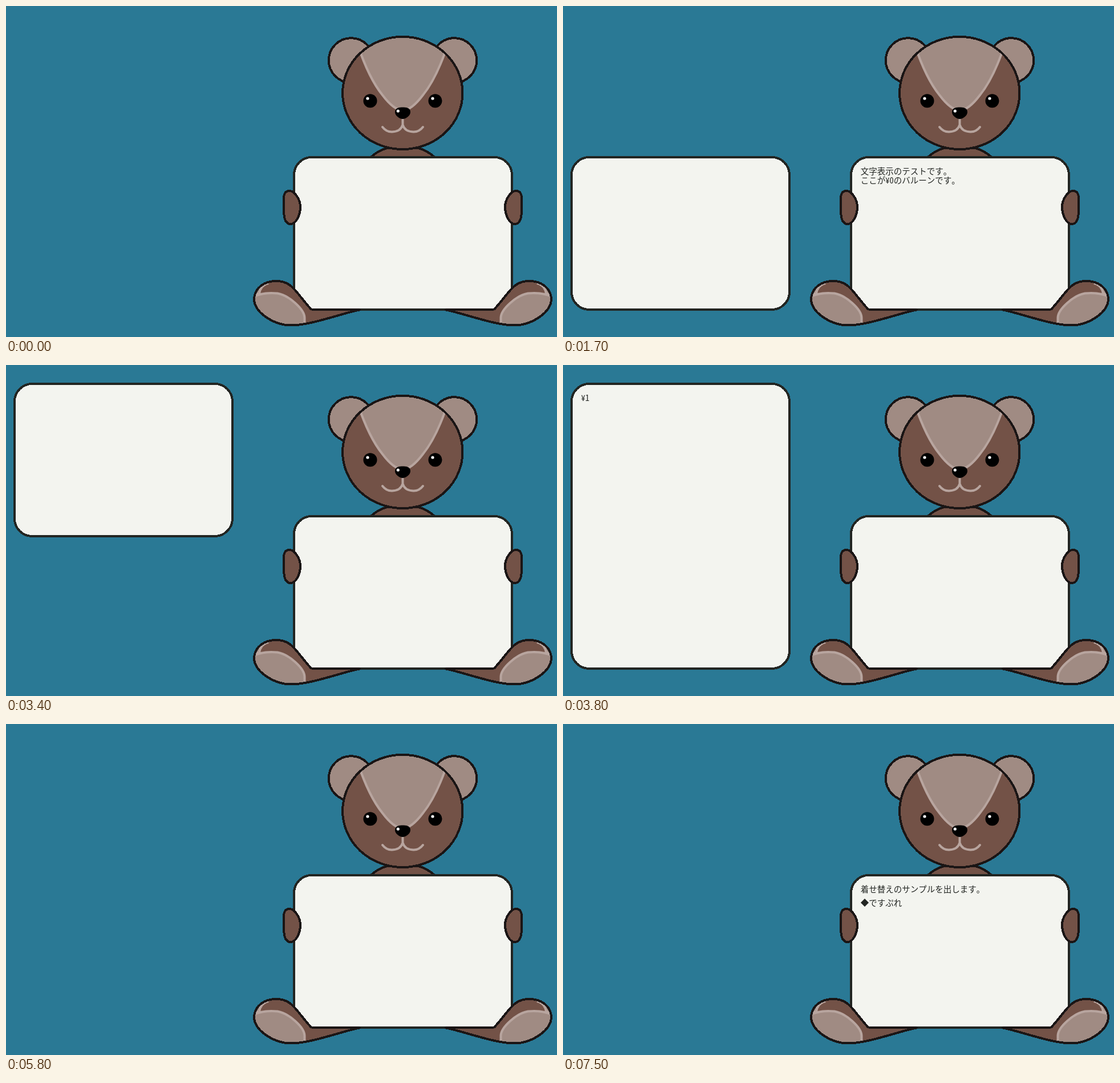
Recreate the animation shown at these times as an HTML page. Size 966 by 580 pixels, loop 8000 ms.

```html
<!DOCTYPE html>
<html lang="ja">
<head>
<meta charset="utf-8">
<title>Bear with balloons</title>
<style>
  html, body { margin: 0; width: 100%; height: 100%; overflow: hidden; background: #2a7995; }
  svg { display: block; width: 966px; height: 580px; }
  .fur { fill: #735247; }
  .pale { fill: #a08b83; }
  .line { fill: none; }
  .edge { stroke: #1a1515; stroke-width: 4; stroke-linejoin: round; shape-rendering: crispEdges; }
  .seam { stroke: #b8a59f; stroke-width: 4; stroke-linecap: round; }
  .board { fill: #f3f4ef; stroke: #222522; stroke-width: 4; shape-rendering: crispEdges; }
  text { font: 14.5px "Noto Sans Mono CJK JP", "Noto Sans CJK JP", "Noto Sans CJK", monospace; fill: #222522; white-space: pre; }
</style>
</head>
<body>
<svg viewBox="0 0 966 580">
  <defs>
    <ellipse id="head" cx="695.3" cy="152.4" rx="105.2" ry="98.6"/>
    <path id="leg" d="M472 482C502 481 507 501 535 531.5L620 532.5C590 538 535 559.5 500 559.5C470 559.5 434 537 435 512C437 493 453 482.5 472 482Z"/>
    <clipPath id="headClip"><use href="#head"/></clipPath>
    <clipPath id="legClip"><use href="#leg"/></clipPath>
    <circle id="ear" class="pale edge" cx="605" cy="95.3" r="39.2"/>
    <g id="limbs">
      <use href="#leg" class="fur"/>
      <g clip-path="url(#legClip)">
        <path class="pale seam" d="M460 486C450 488 445 496 444 504L425 505V475Z"/>
        <path class="pale seam" d="M430 511C448 502 464 502.5 476 503.5C496 507 523 531 523.5 546V570H425Z"/>
      </g>
      <use href="#leg" class="line edge"/>
      <path class="fur edge" d="M497 324C506 324 516 339 516 352C516 367 508 382 499 382C490 382 487 371 487 358V338C487 328 490 324 497 324Z"/>
    </g>
    <g id="eye">
      <circle cx="638.5" cy="166.3" r="12"/>
      <circle cx="634" cy="162" r="2.6" fill="#fff"/>
    </g>
  </defs>

  <rect width="966" height="580" fill="#2a7995"/>
  <path class="fur edge" d="M636 268Q655 250 675 248H716Q736 250 755 268Z"/>
  <use href="#ear"/>
  <use href="#ear" transform="matrix(-1 0 0 1 1391 0)"/>
  <use href="#head" class="fur"/>
  <g clip-path="url(#headClip)">
    <path class="pale seam" d="M617 69C630 108 643 135 660 156C672 172 684 182.5 695.5 183C707 182.5 719 172 731 156C748 135 761 108 774 69V40H617Z"/>
  </g>
  <use href="#head" class="line edge"/>
  <use href="#eye"/>
  <use href="#eye" x="114"/>
  <path class="seam line" d="M695.5 196V208M660 212Q667 221 677 220.5Q692 220 695.5 208Q699 220 714 220.5Q724 221 731 212"/>
  <path d="M682 186C682 178 690 177.5 695.5 177.5S709 178 709 186C709 192 701 198 695.5 198S682 192 682 186Z"/>
  <circle cx="687.3" cy="184" r="2.6" fill="#fff"/>

  <rect class="board" x="505" y="265" width="382" height="267" rx="31"/>
  <use href="#limbs"/>
  <use href="#limbs" transform="matrix(-1 0 0 1 1391 0)"/>
  <rect id="balloon" class="board" x="15" y="265" width="382" height="267" rx="31"/>
  <g id="words"></g>
</svg>
<script>
  const LOOP = 8000, TICK = 100;
  const balloon = document.getElementById('balloon');
  const words = document.getElementById('words');

  // Times in ms; step is the delay between typed characters.
  const lines = [
    { text: '文字表示のテストです。', x: 521.7, y: 295, start: 100, step: 65, end: 3400 },
    { text: 'ここが¥0のバルーンです。', x: 521.7, y: 310.5, start: 870, step: 48, end: 3400 },
    { text: 'ここが¥1のバルーンです。', x: 31.7, y: 295, start: 1750, step: 42, end: 3400 },
    { text: '¥1のバルーンは大きいものも用意してあります。', x: 31.7, y: 63, start: 3720, step: 56, end: 5800 },
    { text: '着せ替えのサンプルを出します。', x: 521.7, y: 295, start: 6000, step: 55, end: LOOP },
    { text: '◆ですぷれ', x: 521.7, y: 319, start: 6880, step: 60, end: LOOP }
  ];

  for (const line of lines) {
    line.node = document.createElementNS('http://www.w3.org/2000/svg', 'text');
    line.node.setAttribute('x', line.x);
    line.node.setAttribute('y', line.y);
    words.append(line.node);
  }

  function typed({ text, start, step, end }, t) {
    return t < start || t >= end ? '' : text.slice(0, Math.floor((t - start) / step) + 1);
  }

  function draw(t) {
    balloon.style.display = t >= 1700 && t < 5800 ? '' : 'none';
    balloon.setAttribute('y', t < 3400 ? 265 : 33);
    balloon.setAttribute('height', t < 3500 ? 267 : 499);
    for (const line of lines) {
      const shown = typed(line, t);
      if (line.node.textContent !== shown) line.node.textContent = shown;
    }
  }

  const began = performance.now();
  function frame() {
    const t = (performance.now() - began) % LOOP;
    draw(Math.floor(t / TICK) * TICK);
    requestAnimationFrame(frame);
  }
  frame();
</script>
</body>
</html>
```
